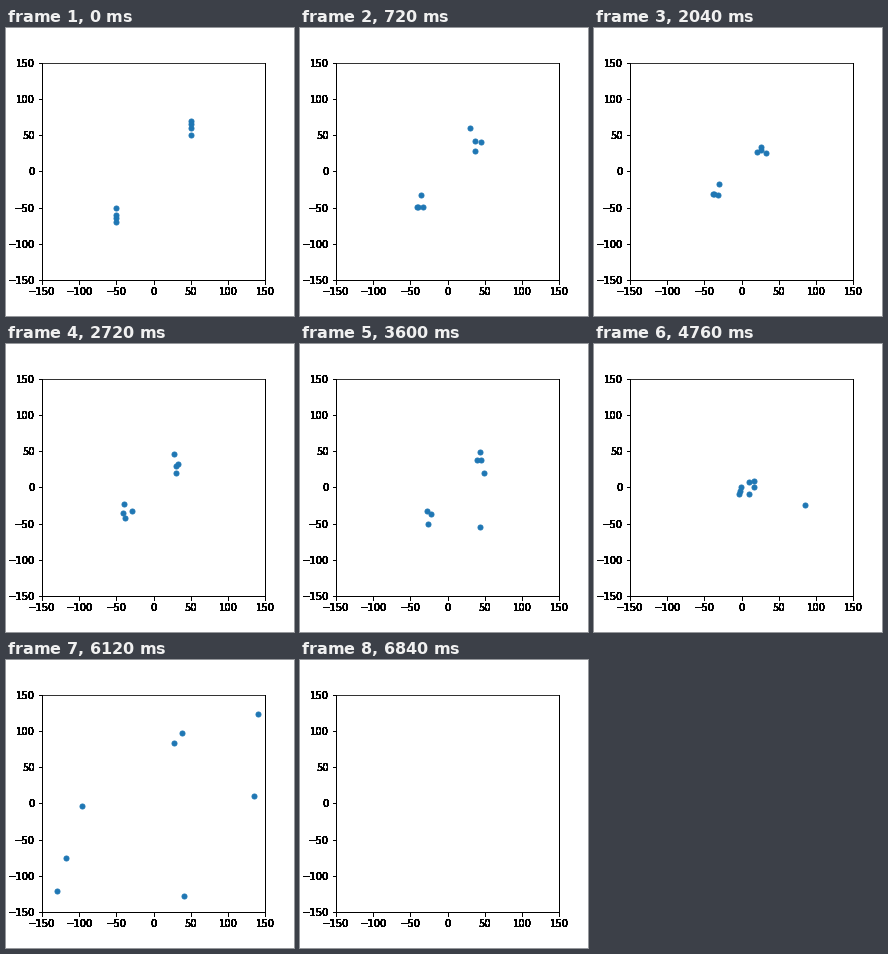
A matplotlib script for the animation above (8000 ms loop, 288x288 px).

```python
import numpy as np
import matplotlib.pyplot as plt
from matplotlib.animation import FuncAnimation

SIZE, FRAMES, STEP = 288, 200, 40
LIM, END = 150, 171
PERIOD = 140 / 3   # orbit of a body around its cluster, in frames
HUB = np.array([7, 0])

# Each body starts in a column and circles its cluster on an ellipse.
RISE = np.array([-11, -1, 4, 9])
SWING_A = np.array([[10, -14], [-11, 5], [1, -3], [0, 12]])
SWING_B = np.array([[-1, 0], [10, 11], [2, -2]])

# Where the bodies stand shortly after the clusters collide and scatter.
BURST_A = np.array([[27, -74], [-53, -2], [-65, -44], [-72, -70]])
BURST_B = np.array([[25, 56], [84, 71], [81, 6]])


def spline(*stops):
    """Smooth path through (time, x, y) stops."""
    stops = np.array(stops, float)
    keys, pts = stops[:, 0], stops[:, 1:]
    slopes = np.gradient(pts, keys, axis=0)

    def at(t):
        i = int(np.clip(np.searchsorted(keys, t, "right") - 1,
                        0, len(keys) - 2))
        span = keys[i + 1] - keys[i]
        u = min((t - keys[i]) / span, 1)
        ease = u * u * (3 - 2 * u)
        return (pts[i] + (pts[i + 1] - pts[i]) * ease
                + span * u * (1 - u)
                * ((1 - u) * slopes[i] - u * slopes[i + 1]))
    return at


centre_a = spline((0, 50, 61), (35, 28, 30), (68, 30, 32),
                  (90, 44, 36), (119, *HUB))
centre_b = spline((0, -50, -61), (35, -24, -27), (68, -39, -32),
                  (90, -27, -42), (119, *HUB))
runaway = spline((0, -50, -65), (35, -34, -37), (68, -29, -33),
                 (90, 43.5, -55), (119, 85, -24), (139, 50, 31),
                 (END, -2, 156))


def cluster(t, centre, rise, swing, burst):
    a = 2 * np.pi * t / PERIOD
    column = np.stack([0 * rise, rise], axis=1)
    orbit = centre(t) + column * np.cos(a) - swing * np.sin(a)
    # Straight flight out of the hub, speeding up at the end.
    reach = max(0.05, 0.13 + 0.0435 * (t - 119))
    reach += 0.0006 * max(t - 139, 0) ** 2
    flight = HUB + (burst - HUB) * reach
    u = np.clip((t - 100) / 19, 0, 1)
    return orbit + (flight - orbit) * u * u * (3 - 2 * u)


def positions(t):
    return np.vstack([
        cluster(t, centre_a, RISE, SWING_A, BURST_A),
        cluster(t, centre_b, -RISE[[0, 1, 3]], SWING_B, BURST_B),
        runaway(t),
    ])


plt.rcParams.update({"font.family": "DejaVu Sans", "font.size": 10})
fig = plt.figure(figsize=(SIZE / 72, SIZE / 72), dpi=72, facecolor="white")
ax = fig.add_axes([0.125, 0.125, 0.775, 0.755])
ticks = range(-LIM, LIM + 1, 50)
ax.set(xlim=(-LIM, LIM), ylim=(-LIM, LIM), xticks=ticks, yticks=ticks)

# Overprint the scales many times: black ink on white multiplies.
ax.spines.top.set_visible(False)
fig.canvas.draw()
ink = np.asarray(fig.canvas.buffer_rgba())[..., :3] / 255
fig.figimage(ink ** 20, zorder=-1)
ax.spines.top.set_visible(True)
ax.patch.set_visible(False)
ax.xaxis.set_visible(False)
ax.yaxis.set_visible(False)

dots, = ax.plot([], [], "o", ms=5, mew=1, color="#1f77b4")


def update(n):
    dots.set_data(*positions(min(n, END)).T)
    return dots,


anim = FuncAnimation(fig, update, frames=FRAMES, interval=STEP,
                     repeat=True, repeat_delay=0, blit=False)
plt.show()
```
